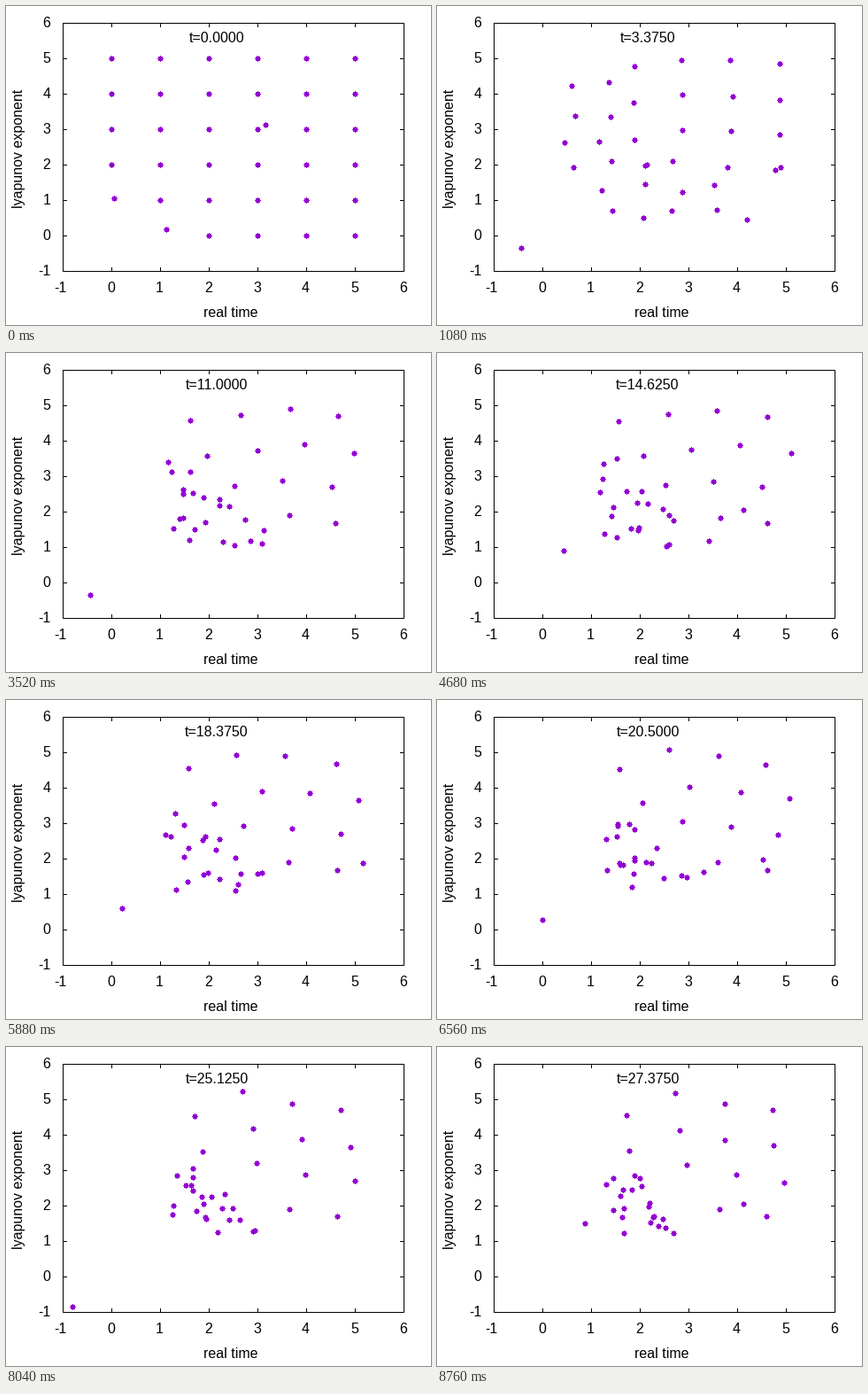
Recreate the animation shown at these times as a matplotlib script. Size 480 by 360 pixels, loop 8.8 s.

```python
import numpy as np
import matplotlib.pyplot as plt
from matplotlib.animation import FuncAnimation
from matplotlib.collections import PolyCollection

FRAMES, INTERVAL, DT = 220, 40, 0.125
SETTLED, LAST = 53, FRAMES - 1
TAU = 2 * np.pi
plt.rcParams["font.family"] = "Liberation Sans"
plt.rcParams["font.size"] = 16

fig = plt.figure(figsize=(480 / 72, 360 / 72), dpi=72, facecolor="white")
ax = fig.add_axes([0, 0, 1, 1])
ax.set(xlim=(0, 480), ylim=(360, 0))
ax.axis("off")


def px(x):
    return 119 + 55 * x


def py(y):
    return 259 - 40 * y


def line(xs, ys):
    ax.plot(np.array(xs) + 0.5, np.array(ys) + 0.5, color="black", lw=1,
            snap=False, solid_capstyle="projecting", solid_joinstyle="miter")


def label(x, y, text, ha="center", **kw):
    return ax.text(x, y, text, ha=ha, va="baseline", **kw)


# Plot frame, mirrored ticks and labels
left, right, top, bottom = px(-1), px(6), py(6), py(-1)
line([left, right, right, left, left], [top, top, bottom, bottom, top])
for v in range(-1, 7):
    x, y = px(v), py(v)
    if -1 < v < 6:
        line([x, x], [bottom, bottom - 4])
        line([x, x], [top, top + 4])
        line([left, left + 4], [y, y])
        line([right, right - 4], [y, y])
    label(x - 2.5 if v < 0 else x - 0.5, 323, str(v))
    label(50.5, y + 5, str(v), ha="right")
label(254, 351, "real time")
label(19, 160.5, "lyapunov exponent", rotation=90, rotation_mode="anchor")
clock = label(238, 41, "")

# Dots start on a 6 x 6 grid, with the corner ones already disturbed
col, row = np.tile(np.arange(6), 6), np.repeat(np.arange(6), 6)
grid = np.column_stack([col, row]).astype(float)
start = grid.copy()
start[[0, 1, 6]] = (3.16, 3.12), (1.12, 0.18), (0.05, 1.05)

# The upper right keeps its lattice, the rest swarms, two strays swing far out
calm = (((row >= 3) & (col >= 3)) | ((row >= 4) & (col == 2))
        | ((row == 2) & (col >= 4)))
LOW, FAR = 6, 11
settle = np.full(36, SETTLED)
settle[[LOW, FAR]] = 12

rng = np.random.default_rng(7)
period = rng.uniform(14, 40, (36, 2))
phase = rng.uniform(0, TAU, (36, 2))
amp = np.where(calm, 0.03, 0.25)[:, None] * rng.uniform(0.6, 1.2, (36, 2))
sag = np.array([0, 0, -0.45, -0.05, -0.13, -0.32])


def lattice(u):
    """Grid whose rows slide sideways and whose columns sag."""
    wave, arch = np.sin(0.85 * TAU * u), np.sin(np.pi * u)
    slide = np.array([0, 0, -0.38, -0.25 - 0.25 * wave,
                      -0.22 + 0.32 * arch, -0.25 - 0.17 * arch])
    lift = np.where(col == 3, -0.25 * wave, 0)
    return grid + np.column_stack([slide[row], sag[col] + lift])


def swarm(u):
    """Grid squeezed ever tighter around the centre."""
    return np.array([2.1, 2.1]) + (0.45 - 0.17 * u) * (grid - (2.1, 2.1))


def positions(n):
    u = max(0, n - SETTLED) / (LAST - SETTLED)
    goal = np.where(calm[:, None], lattice(u), swarm(u))
    goal += amp * np.cos(TAU * n / period + phase)
    low, far = np.cos(TAU * n / 11.5), np.cos(TAU * (n - SETTLED) / 23)
    goal[LOW] = 0.05 + 0.85 * low, 0.35 + 1.2 * low
    goal[FAR] = 3.8 + 1.6 * far, 2.1 - 0.25 * far
    s = np.clip(n / settle, 0, 1)[:, None]
    return start + (goal - start) * s * s * (3 - 2 * s)


# Pixel-stepped round dot, 7 px across
corner = np.array([(3.5, 0.5), (2.5, 0.5), (2.5, 2.5), (0.5, 2.5), (0.5, 3.5)])
dot = np.vstack([corner, corner[::-1] * (-1, 1), -corner, corner[::-1] * (1, -1)])
dots = PolyCollection([], facecolors="#9400d3", edgecolors="none",
                      linewidths=0, antialiaseds=False, zorder=5)
ax.add_collection(dots, autolim=False)


def update(n):
    x, y = positions(n).T
    centres = np.round(np.column_stack([px(x), py(y)])) + 0.5
    dots.set_verts(centres[:, None] + dot)
    clock.set_text(f"t={n * DT:.4f}")
    return dots, clock


anim = FuncAnimation(fig, update, frames=FRAMES, interval=INTERVAL,
                     init_func=lambda: update(0), repeat=True, repeat_delay=0)
plt.show()
```
